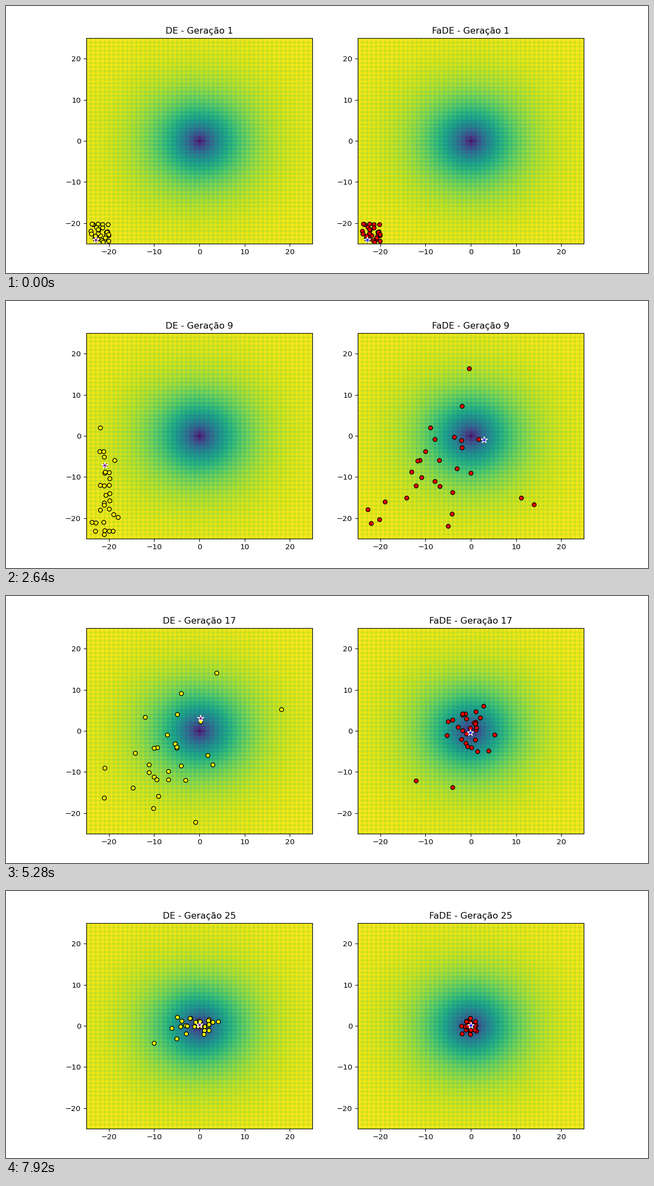
Animation of 1159x483 px, one loop 8 s. Source, as a matplotlib script:

```python
import numpy as np
import matplotlib.pyplot as plt
from matplotlib.animation import FuncAnimation

SIZE = 30       # individuals per population
LIM = 25        # search space is [-LIM, LIM] on both axes
GENS = 25
STEP = 40       # ms per drawn frame
HOLD = 330      # ms per generation
LOOP = 8000
SCALE = 1159 / 1200     # a 12 x 5 inch layout fitted to the stage

plt.rcParams.update({
    "font.size": 10 * SCALE,
    "axes.linewidth": 0.8 * SCALE,
    "axes.titlepad": 6 * SCALE,
})

# generation: (best x, y), (swarm centre x, y), (swarm spread x, y)
DE = {
    1: ((-22.9, -24.1), (-22.3, -22.4), (1.2, 1.2)),
    4: ((-22.8, 2), (-21.5, -21.3), (1.1, 1.6)),
    9: ((-20.9, -7.1), (-21, -13), (1.2, 8.5)),
    14: ((2.8, 4.8), (-10, -8), (8, 7)),
    17: ((0.3, 3.1), (-2, -3), (8, 7)),
    21: ((2.1, 0.2), (-0.5, 2), (4.2, 2.4)),
    25: ((0, 0.2), (0, 0), (1.4, 1)),
}
FADE = {
    1: ((-22.9, -24.1), (-22.3, -22.4), (1.2, 1.2)),
    4: ((-22.9, 2), (-21.5, -20.5), (1.5, 2.5)),
    9: ((2.9, -1), (-1, -1.5), (6, 7)),
    14: ((0.1, 0.8), (-0.3, 0.8), (2.3, 3)),
    17: ((-0.1, -0.4), (0, 1), (1.6, 2)),
    21: ((-0.1, -0.4), (0, 0), (0.8, 0.8)),
    25: ((0, 0.1), (0, 0), (0.55, 0.55)),
}


def ackley(x, y):
    hill = -20 * np.exp(-0.2 * np.sqrt((x**2 + y**2) / 2))
    waves = np.exp((np.cos(2 * np.pi * x) + np.cos(2 * np.pi * y)) / 2)
    return hill - waves + 20 + np.e


def envelope(keys, gen):
    """Swarm centre and spread, eased linearly between key generations."""
    gens = list(keys)
    rows = np.array([keys[g][1] + keys[g][2] for g in gens])
    vals = np.array([np.interp(gen, gens, col) for col in rows.T])
    return vals[:2], vals[2:]


def trial(rng, centre, spread):
    """New candidates near the local minima, which sit on whole numbers."""
    tails = np.clip(rng.standard_t(3, (SIZE, 2)), -2.5, 2.5)
    pts = np.round(centre + spread * tails)
    over = np.abs(pts) >= LIM
    pts = np.where(over, np.sign(pts) * 2 * (LIM - 1) - pts, pts)
    return pts + rng.normal(0, 0.17, pts.shape)


def evolve(keys, seed):
    """Populations of all generations, the best member always first."""
    rng = np.random.default_rng(seed)
    start = np.random.default_rng(4).uniform(-24.8, -20, (SIZE, 2))
    start[0] = keys[1][0]
    steps = [start]
    for gen in range(2, GENS + 1):
        centre, spread = envelope(keys, gen)
        cur = steps[-1].copy()
        far = (np.abs(cur - centre) > 3 * spread).any(axis=1)
        jump = rng.random(SIZE) < np.where(far, 0.5, 0.3)
        cur[jump] = trial(rng, centre, spread)[jump]
        near = min(keys, key=lambda k: abs(k - gen))
        cur[0] = keys[near][0]
        steps.append(cur)
    return steps


fig, axes = plt.subplots(1, 2, figsize=(11.59, 4.83), dpi=100)
gx, gy = np.meshgrid(np.linspace(-LIM, LIM, 409), np.linspace(-LIM, LIM, 372))
field = ackley(gx, gy)


class Panel:
    def __init__(self, ax, name, steps, color, best):
        self.ax, self.name, self.steps = ax, name, steps
        ax.imshow(field, cmap="viridis", origin="lower", aspect="auto",
                  extent=(-LIM, LIM, -LIM, LIM), interpolation="nearest")
        ticks = range(-20, 21, 10)
        ax.set(xlim=(-LIM, LIM), ylim=(-LIM, LIM), xticks=ticks, yticks=ticks)
        ax.tick_params(length=3.5 * SCALE, width=0.8 * SCALE, pad=3.5 * SCALE)
        self.dots = ax.scatter([], [], s=30 * SCALE**2, c=color,
                               edgecolors="black", linewidths=SCALE, zorder=2)
        self.star = ax.scatter([], [], s=80 * SCALE**2, c=best, marker="*",
                               edgecolors="white", linewidths=SCALE, zorder=3)

    def show(self, gen):
        pts = self.steps[gen - 1]
        self.dots.set_offsets(pts)
        self.star.set_offsets(pts[:1])
        self.ax.set_title(f"{self.name} - Geração {gen}")


panels = [Panel(axes[0], "DE", evolve(DE, 11), "yellow", "purple"),
          Panel(axes[1], "FaDE", evolve(FADE, 23), "red", "blue")]


def update(i):
    gen = min(GENS, 1 + (i * STEP + STEP - 1) // HOLD)
    for p in panels:
        p.show(gen)
    return []


anim = FuncAnimation(fig, update, frames=LOOP // STEP, interval=STEP,
                     init_func=lambda: update(0), repeat=True,
                     repeat_delay=0, blit=False)
plt.show()
```
